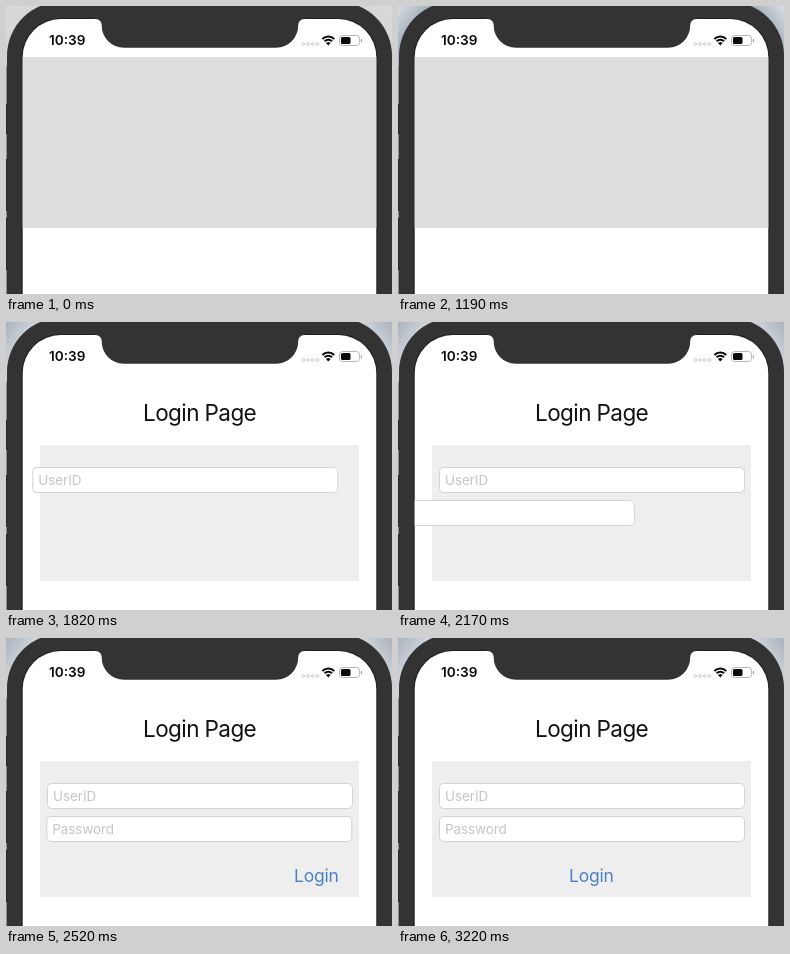
An HTML page with a canvas that plays this animation: 386 px wide and 288 px high, repeating every 3290 ms.

```html
<!DOCTYPE html>
<html lang="en">
<head>
<meta charset="utf-8">
<title>Login page intro</title>
<style>
  html, body { margin: 0; width: 100%; height: 100%; overflow: hidden; background: #333; }
  canvas { display: block; width: 386px; height: 288px; }
</style>
</head>
<body>
<canvas id="stage"></canvas>
<script>
const W = 386, H = 288, LOOP = 3290, STEP = 70;
const FONT = 'Inter, "Liberation Sans", sans-serif';
const SLIDE = 354; // screen width: everything enters from one screen to the left

const canvas = document.getElementById('stage');
const ratio = window.devicePixelRatio || 1;
canvas.width = W * ratio;
canvas.height = H * ratio;
const ctx = canvas.getContext('2d');
ctx.scale(ratio, ratio);

function box(x, y, w, h, color) {
  ctx.fillStyle = color;
  ctx.fillRect(x, y, w, h);
}

function roundBox(x, y, w, h, r, fill, stroke) {
  ctx.beginPath();
  ctx.roundRect(x, y, w, h, r);
  if (fill) { ctx.fillStyle = fill; ctx.fill(); }
  if (stroke) { ctx.strokeStyle = stroke; ctx.lineWidth = 1; ctx.stroke(); }
}

function text(str, x, y, size, color, { weight = 400, align = 'left', spacing = 0 } = {}) {
  ctx.font = `${weight} ${size}px ${FONT}`;
  ctx.letterSpacing = spacing + 'px';
  ctx.textAlign = align;
  ctx.fillStyle = color;
  ctx.fillText(str, x, y);
}

// Critically damped spring
function glide(t, start) {
  const u = Math.max(0, t - start) / 1000 * 17.3;
  return -SLIDE * (1 + u) * Math.exp(-u);
}

// Underdamped spring
function bounce(t, start) {
  const s = Math.max(0, t - start) / 1000, k = 5.8, w = 16.5;
  if (s > 0.68) return 0;
  return -SLIDE * Math.exp(-k * s) * (Math.cos(w * s) + k / w * Math.sin(w * s));
}

function drawBody(t) {
  const tones = t < 210 ? ['#dadada', '#d6d6d6']
    : t < 1330 ? ['#d8dde2', '#a8b2bc']
    : ['#aab2bb', '#cdd3d9'];
  for (const side of [0, W]) {
    const g = ctx.createLinearGradient(side, 0, Math.abs(side - 20), 14);
    g.addColorStop(0, tones[0]);
    g.addColorStop(1, tones[1]);
    box(side ? W / 2 : 0, 0, W / 2, 60, g);
  }
  box(0, 60, 2, H, '#8c8c8e');
  roundBox(1, -4, 385, 400, 54, '#333');
  for (const [y, h] of [[98, 30], [153, 52], [212, 52]]) box(0, y, 1, h, '#25272b');
}

function screenPath() {
  ctx.beginPath();
  ctx.roundRect(16.7, 13, 353.6, 320, 38);
}

function drawNotch() {
  const left = 95.7, right = 292.2, top = 13, bottom = 41.7;
  ctx.beginPath();
  ctx.moveTo(left - 7, top - 1);
  ctx.lineTo(left - 7, top);
  ctx.arcTo(left, top, left, bottom, 6);
  ctx.arcTo(left, bottom, right, bottom, 22);
  ctx.arcTo(right, bottom, right, top, 22);
  ctx.arcTo(right, top, right + 7, top, 6);
  ctx.lineTo(right + 7, top);
  ctx.lineTo(right + 7, top - 1);
  ctx.fillStyle = '#333';
  ctx.fill();
}

function drawStatus() {
  text('10:39', 61.2, 39, 13.6, '#0a0a0a', { weight: 600, align: 'center' });

  ctx.lineWidth = 0.8;
  ctx.strokeStyle = '#bdbdbd';
  for (let i = 0; i < 4; i++) {
    ctx.beginPath();
    ctx.arc(297.5 + i * 4.6, 38, 1.3, 0, 7);
    ctx.stroke();
  }

  ctx.strokeStyle = ctx.fillStyle = '#0a0a0a';
  ctx.lineWidth = 2;
  for (const r of [8.4, 5.3]) {
    ctx.beginPath();
    ctx.arc(322.3, 39, r, -Math.PI * 0.75, -Math.PI * 0.25);
    ctx.stroke();
  }
  ctx.beginPath();
  ctx.moveTo(322.3, 39.4);
  ctx.arc(322.3, 39.4, 3.3, -Math.PI * 0.75, -Math.PI * 0.25);
  ctx.fill();

  roundBox(333.5, 29.5, 20, 10, 3, null, '#b5b5b5');
  roundBox(335, 31, 9.5, 7, 1.5, '#0a0a0a');
  roundBox(354.8, 33, 1.2, 3.4, 0.6, '#aaa');
}

function drawField(label, x, y) {
  roundBox(x + 0.5, y + 0.5, 305, 25, 4, '#fff', '#d3d3d3');
  text(label, x + 6, y + 17.5, 13.5, '#c5c5c8', { spacing: -0.1 });
}

function drawPage(t) {
  if (t < 1330) {
    box(16, 51, 356, 171, '#dedede');
    return;
  }
  text('Login Page', 193.6, 99, 22.5, '#111', { align: 'center', spacing: -0.6 });
  box(34, 123, 319, 136, '#eee');
  drawField('UserID', 41 + glide(t, 1533), 145);
  drawField('Password', 41 + glide(t, 2032), 178);
  text('Login', 171 + bounce(t, 2325), 244, 17.5, '#4c82c0', { spacing: -0.2 });
}

function draw(t) {
  ctx.clearRect(0, 0, W, H);
  drawBody(t);
  screenPath();
  ctx.strokeStyle = '#1d1d1d';
  ctx.lineWidth = 2;
  ctx.stroke();
  ctx.save();
  screenPath();
  ctx.clip();
  box(0, 0, W, H, '#fff');
  drawPage(t);
  drawStatus();
  ctx.restore();
  drawNotch();
}

const begin = performance.now();
function tick() {
  const t = (performance.now() - begin) % LOOP;
  draw(Math.floor(t / STEP) * STEP);
  requestAnimationFrame(tick);
}
tick();
</script>
</body>
</html>
```
